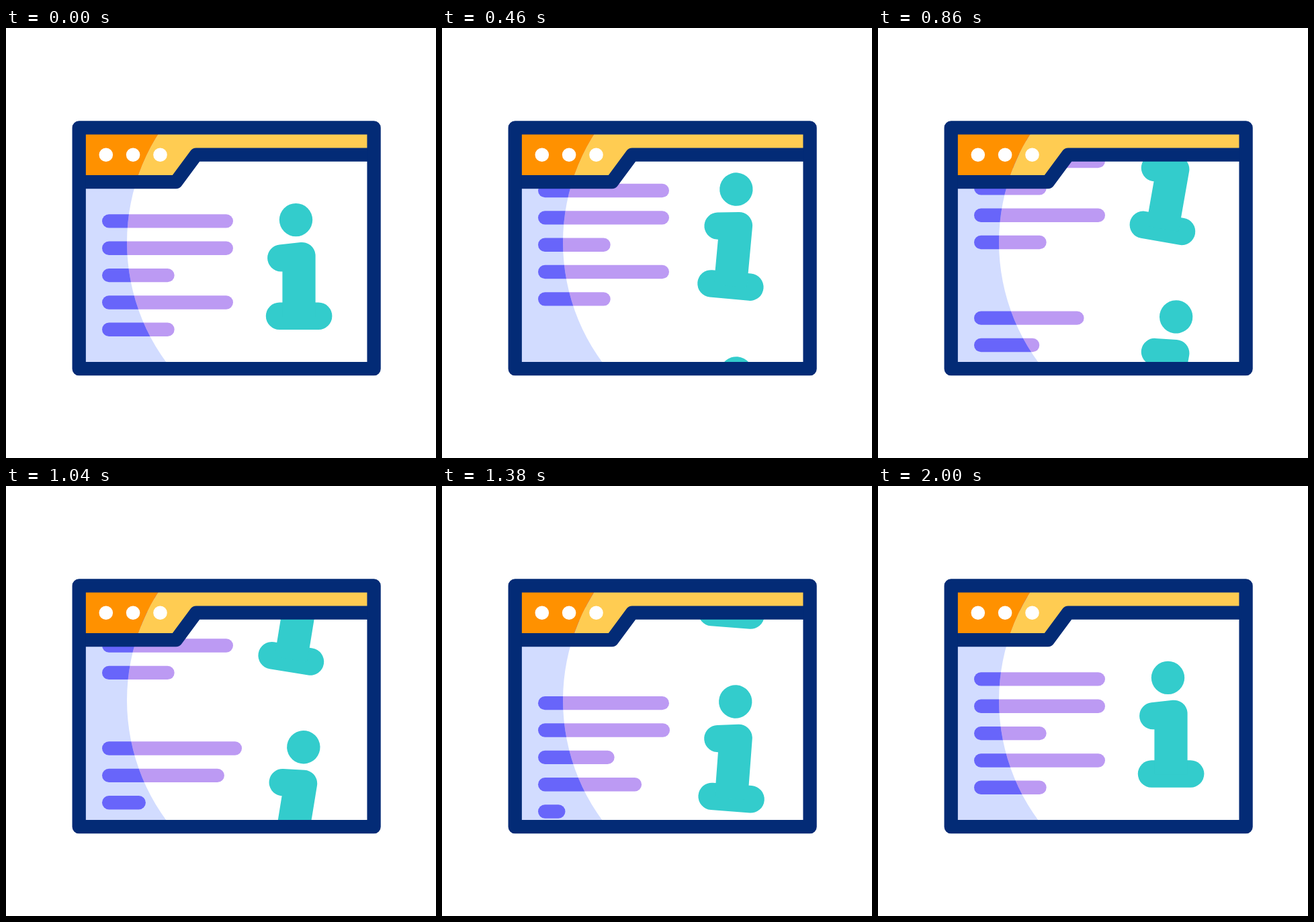
Recreate the animation shown at these times as an HTML page with a canvas. Size 640x640 px, loop 2020 ms.

```html
<!DOCTYPE html>
<html lang="en">
<head>
<meta charset="utf-8">
<title>Info window</title>
<style>
html, body { margin: 0; width: 100%; height: 100%; overflow: hidden; background: #fff; }
canvas { display: block; width: 640px; height: 640px; }
</style>
</head>
<body>
<canvas id="stage" width="640" height="640"></canvas>
<script>
const ctx = document.getElementById('stage').getContext('2d');
const LOOP = 2020, SCROLL = 1785, GAP = 274;
const NAVY = '#032b76', TEAL = '#33cccc';
const LIGHT = { page: '#ffffff', bar: '#bc9af3', tab: '#ffcc52' };
const SHADE = { page: '#d2dcff', bar: '#6865fa', tab: '#ff9100' };

// Each text line: full width and the delay before it grows in
const LINES = [[195, 0], [195, 134], [107.7, 275], [195, 541], [107.7, 701]];
const GROW = { start: 440, peak: 1040, end: 1290, over: 1.067 };

function ease(t, from, to) {
  const s = Math.min(1, Math.max(0, (t - from) / (to - from)));
  return s * s * (3 - 2 * s);
}

function growth(t) {
  return GROW.over * ease(t, GROW.start, GROW.peak)
    - (GROW.over - 1) * ease(t, GROW.peak, GROW.end);
}

function disc(x, y, r, color) {
  ctx.fillStyle = color;
  ctx.beginPath();
  ctx.arc(x, y, r, 0, Math.PI * 2);
  ctx.fill();
}

function pill(x, y, w, h, color) {
  if (w <= 0) return;
  ctx.fillStyle = color;
  ctx.beginPath();
  ctx.roundRect(x, y, w, h, Math.min(w, h) / 2);
  ctx.fill();
}

function drawLines(dy, color, scaleAt) {
  LINES.forEach(([w, delay], i) => {
    pill(143, 277.2 + i * 40.35 + dy, w * scaleAt(delay), 20.4, color);
  });
}

function tabPath() {
  ctx.beginPath();
  ctx.moveTo(108.7, 229.1);
  ctx.lineTo(253, 229.1);
  ctx.lineTo(283, 188.6);
  ctx.lineTo(547.7, 188.6);
}

// Window contents in one palette: page, both copies of the text, tab bar
function drawPane(t, dy, pal) {
  ctx.fillStyle = pal.page;
  ctx.fillRect(108, 148, 440, 360);
  drawLines(dy, pal.bar, () => 1);
  drawLines(dy + GAP, pal.bar, delay => growth(t - delay));
  tabPath();
  ctx.lineTo(547.7, 148.5);
  ctx.lineTo(108.7, 148.5);
  ctx.fillStyle = pal.tab;
  ctx.fill();
}

function drawInfo(dy, angle) {
  ctx.save();
  ctx.translate(436.2, 355.5 + dy);
  ctx.rotate(angle);
  ctx.translate(-436.2, -355.5);
  disc(431.5, 285.6, 24.7, TEAL);
  pill(386.8, 408.5, 98.6, 40.5, TEAL);
  const slope = -Math.PI / 2 - 0.111;
  ctx.beginPath();
  ctx.moveTo(411.4, 430);
  ctx.lineTo(411.4, 362.5);
  ctx.arc(409.2, 342.4, 20.1, Math.PI / 2, slope);
  ctx.arc(440.6, 338.9, 20, slope, 0);
  ctx.lineTo(460.6, 430);
  ctx.fill();
  ctx.restore();
}

function drawFrame() {
  ctx.strokeStyle = NAVY;
  ctx.lineWidth = 20.3;
  ctx.lineJoin = 'round';
  tabPath();
  ctx.stroke();
  ctx.strokeRect(108.7, 148.4, 438.9, 358.8);
}

function draw(t) {
  const dy = -GAP * ease(t, 0, SCROLL);
  const half = SCROLL / 2;
  const tilt = Math.PI / 18 * (ease(t, 0, half) - ease(t, half, SCROLL));

  ctx.fillStyle = '#fff';
  ctx.fillRect(0, 0, 640, 640);

  ctx.save();
  ctx.beginPath();
  ctx.rect(108.7, 148.4, 438.9, 358.8);
  ctx.clip();
  drawPane(t, dy, LIGHT);

  // Shaded part lies outside a large circle
  ctx.save();
  ctx.beginPath();
  ctx.rect(100, 140, 200, 380);
  ctx.moveTo(783.2, 319);
  ctx.arc(481.6, 319, 301.6, 0, Math.PI * 2);
  ctx.clip('evenodd');
  ctx.beginPath();
  ctx.rect(100, 140, 200, 380);
  ctx.clip();
  drawPane(t, dy, SHADE);
  ctx.restore();

  // Keep the letter below the tab bar
  ctx.beginPath();
  ctx.rect(300, 188.6, 248, 320);
  ctx.clip();
  drawInfo(dy, tilt);
  drawInfo(dy + GAP - 0.2, tilt);
  ctx.restore();

  drawFrame();
  for (const x of [148.8, 189.1, 229.5]) disc(x, 188.8, 10.3, '#fff');
}

function tick() {
  draw(performance.now() % LOOP);
  requestAnimationFrame(tick);
}
tick();
</script>
</body>
</html>
```
